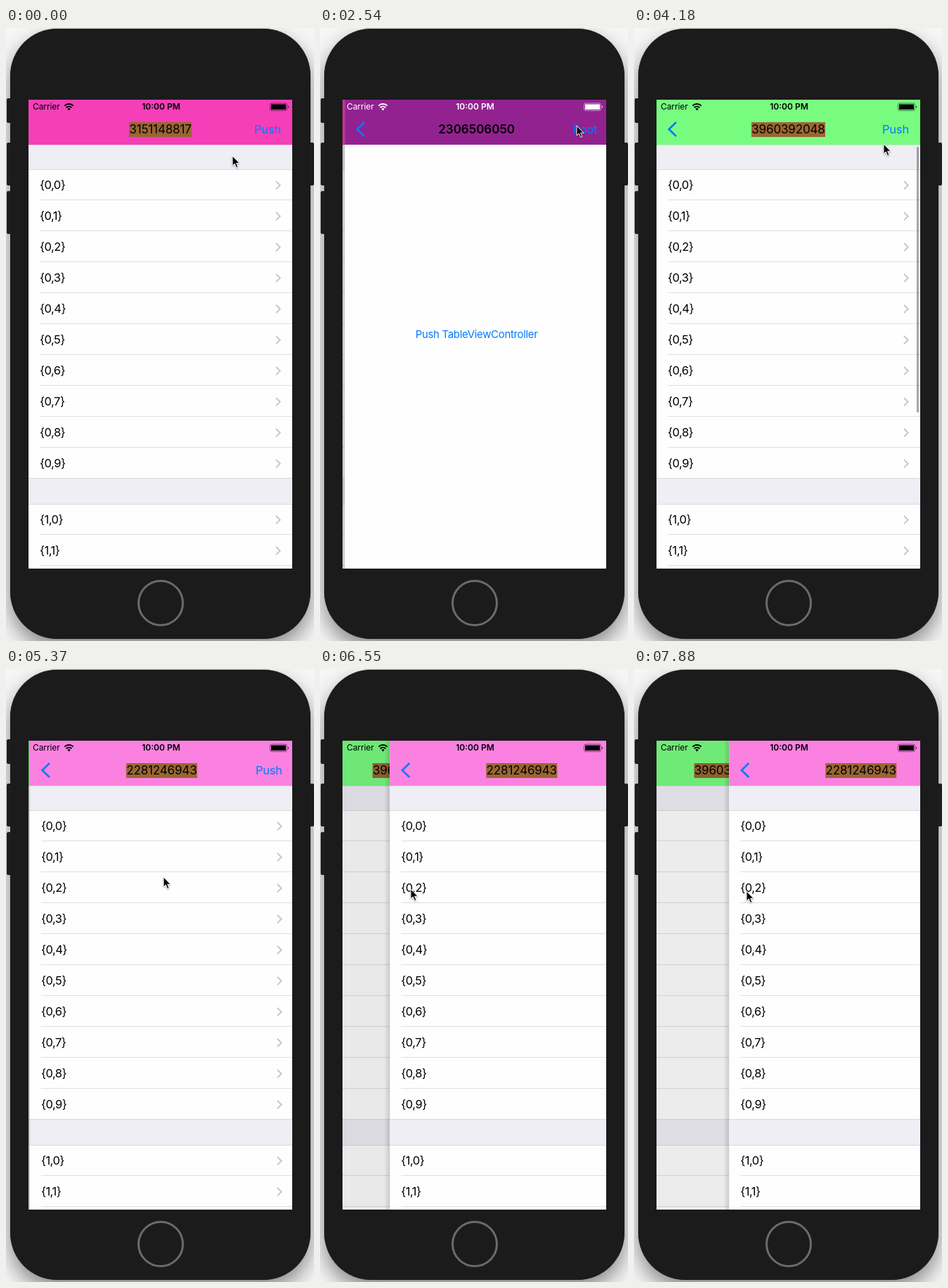
An HTML page that plays this animation: 438x872 px, repeating every 8 s.

```html
<!DOCTYPE html>
<html lang="en">
<head>
<meta charset="utf-8">
<title>Navigation bar transitions</title>
<style>
html, body { margin: 0; width: 100%; height: 100%; overflow: hidden; }
body { position: relative; background: #f6f6f6; font: 16.5px/44px Inter, sans-serif; letter-spacing: -.5px; color: #000; }
div, svg, b, i { position: absolute; box-sizing: border-box; font-style: normal; white-space: nowrap; }
svg { overflow: visible; fill: none; }
.key { width: 8px; background: #242424; border-radius: 2px; }
.body { left: 6px; top: 1px; width: 427px; height: 868px; border-radius: 67px; background: #1b1b1b;
  box-shadow: 0 0 1px #555, 0 14px 30px rgba(0, 0, 0, .45); }
.home { left: 187px; top: 785px; width: 66px; height: 66px; border: 3px solid #6b6b6b; border-radius: 50%; }
.screen { left: 32px; top: 102px; width: 375px; height: 667px; overflow: hidden; background: #fff; }
.page { width: 375px; height: 667px; background: #fefefe; }
.page::before { content: ""; position: absolute; left: -8px; width: 8px; height: 100%;
  background: linear-gradient(90deg, transparent, rgba(0, 0, 0, .14)); }
.bar { width: 375px; height: 64px; }
.title { left: 0; right: 0; top: 32px; line-height: 21px; text-align: center; font-size: 17px; letter-spacing: -.15px; }
.title span { display: inline-block; height: 21px; }
.boxed span { background: #963; }
.plain { font-weight: 600; letter-spacing: 0; }
.item { right: 16px; top: 20px; letter-spacing: -.2px; color: #007aff; }
.push { left: 0; right: 0; top: 312px; text-align: center; font-size: 15px; letter-spacing: -.33px; color: #007aff; }
.head { width: 375px; background: #efeef4; border: solid #dcdbe0; border-width: 1px 0; }
.row { left: 16px; width: 359px; height: 44px; border-bottom: 1px solid #dfdee2; }
.row svg { left: 335.5px; top: 16.5px; }
.scroll { left: 369.5px; top: 67px; width: 3px; height: 378px; border-radius: 2px; background: rgba(0, 0, 0, .35); }
.dim { width: 375px; height: 667px; background: #000; }
.status { width: 375px; height: 20px; z-index: 1; font-size: 12px; line-height: 20px; letter-spacing: 0; }
.status i { left: 6px; letter-spacing: -.1px; }
.status b { left: 0; right: 0; padding-left: 2px; text-align: center; font-weight: 600; }
#cursor { left: 0; top: 0; filter: drop-shadow(0 1px 1px rgba(0, 0, 0, .35)); }
</style>
</head>
<body>
<div class="key" style="left:1px;top:100px;height:35px"></div>
<div class="key" style="left:1px;top:163px;height:61px"></div>
<div class="key" style="left:1px;top:232px;height:61px"></div>
<div class="key" style="left:430px;top:163px;height:61px"></div>
<div class="body"></div>
<div class="home"></div>
<div class="screen" id="screen">
  <div class="status" id="status">
    <i>Carrier</i><b>10:00 PM</b>
    <svg width="375" height="20" stroke="currentColor">
      <path d="M51.3 8.6a9 9 0 0 1 12.4 0M53.6 11.2a5.8 5.8 0 0 1 7.8 0" stroke-width="2"/>
      <path d="M55.3 13a3.2 3.2 0 0 1 4.4 0L57.5 15.4z" fill="currentColor" stroke="none"/>
      <rect x="343.5" y="5" width="24" height="10.5" rx="2.5" stroke-opacity=".5"/>
      <path d="M345 6.5h21v7.5h-21zM369 8.5q2 1.7 0 3.5z" fill="currentColor" stroke="none"/>
    </svg>
  </div>
</div>
<svg id="cursor" width="12" height="18">
  <path d="M0 0V14L3.2 11L5.6 16.6L8 15.6L5.6 10.3H10Z" fill="#000" stroke="#fff"/>
</svg>
<script>
const LOOP = 8000, STEP = 148.6, WIDTH = 375;
const stage = document.getElementById('screen');
const statusBar = document.getElementById('status');
const cursor = document.getElementById('cursor');

// Times are in steps; "start" is when a page begins to slide in.
const pages = [
  { color: '#f53fb8', title: '3151148817', item: 'Push', table: true, start: -99 },
  { color: '#922290', title: '2306506050', item: 'Root', start: 14.7 },
  { color: '#78fc80', title: '3960392048', item: 'Push', table: true, start: 22.6 },
  { color: '#fb81e0', title: '2281246943', item: 'Push', table: true, start: 33.5 }
];

// Pointer moves: to each point between two times
const moves = [
  { from: 1, to: 5, x: 365, y: 139 },         // Push item
  { from: 18, to: 21, x: 224, y: 433 },       // button in the middle
  { from: 24, to: 28, x: 355, y: 165 },
  { from: 29, to: 32, x: 256, y: 286 },       // table row
  { from: 34, to: 36, x: 224, y: 296 },
  { from: 36, to: 39, x: 23, y: 310 },        // left edge
  { from: 39.2, to: 44.1, x: 129, y: 313 },   // first drag
  { from: 47, to: 49, x: 22, y: 315 },
  { from: 50, to: 53, x: 160, y: 316 }        // second drag
];
const RELEASE = 45, SECOND_DRAG = 50;

function easeOut(from, to, k) {
  const f = Math.min(1, Math.max(0, (k - from) / (to - from)));
  return 1 - (1 - f) ** 3;
}

function pointerAt(k) {
  return moves.reduce((p, m) => {
    const f = easeOut(m.from, m.to, k);
    return { x: p.x + (m.x - p.x) * f, y: p.y + (m.y - p.y) * f };
  }, { x: 322, y: 182 });
}

// The top page follows the pointer, and springs back after the first drag.
function dragAt(k, x) {
  if (k < moves[6].from) return 0;
  const pull = Math.max(0, (x - 71) * 1.16);
  return k < SECOND_DRAG ? pull * (1 - easeOut(RELEASE, RELEASE + 2, k)) : pull;
}

// Critically damped slide from the right edge
function slide(k, start) {
  if (k <= start) return WIDTH;
  const d = (k - start) * STEP / 50;
  const x = WIDTH * (1 + d) * Math.exp(-d);
  return x < .4 ? 0 : x;
}

function tableHtml() {
  const head = (y, h) => `<div class="head" style="top:${y}px;height:${h}px"></div>`;
  const rows = (section, top, count) => Array.from({ length: count }, (_, r) =>
    `<div class="row" style="top:${top + 44 * r}px">{${section},${r}}
      <svg width="8" height="12" stroke="#c7c7cc" stroke-width="2"><path d="M0 0L5.7 5.7L0 11.4"/></svg></div>`).join('');
  return rows(0, 99, 10) + rows(1, 575, 3) + head(64, 36) + head(538, 38) + '<div class="scroll"></div>';
}

pages.forEach((page, i) => {
  const el = page.el = document.createElement('div');
  el.className = 'page';
  const back = i ? `<svg style="left:16px;top:32px" width="12" height="20" stroke="#007aff" stroke-width="2.6">
    <path d="M12 0L1.7 10L12 20"/></svg>` : '';
  el.innerHTML = (page.table ? tableHtml() : '<div class="push">Push TableViewController</div>') +
    `<div class="bar" style="background:${page.color}">${back}
      <div class="title ${page.table ? 'boxed' : 'plain'}"><span>${page.title}</span></div>
      <div class="item">${page.item}</div></div><div class="dim"></div>`;
  stage.append(el);
  page.dim = el.querySelector('.dim');
  page.scroll = el.querySelector('.scroll');
});
const pushItem = pages[0].el.querySelector('.item');
const pushButton = pages[1].el.querySelector('.push');

function draw(time) {
  const k = Math.floor(time % LOOP / STEP);
  const pointer = pointerAt(k);
  const offsets = pages.map(p => slide(k, p.start));
  offsets[3] += dragAt(k, pointer.x);
  pages.forEach((page, i) => {
    const next = i < 3 ? offsets[i + 1] : WIDTH;
    const covered = WIDTH - next;
    page.el.style.transform = `translateX(${offsets[i] - .3 * covered}px)`;
    page.el.style.visibility = offsets[i] < WIDTH && next > 0 ? 'visible' : 'hidden';
    page.dim.style.opacity = .1 * covered / WIDTH;
    if (page.scroll) {
      const age = k - page.start;
      page.scroll.style.opacity = age > 3.4 && age < 6 ? 1 : 0;
    }
  });
  pushItem.style.opacity = k === 14 ? .3 : 1;
  pushButton.style.opacity = k === 22 ? .3 : 1;
  statusBar.style.color = k > pages[1].start && k < pages[2].start ? '#fff' : '#000';
  cursor.style.transform = `translate(${pointer.x}px,${pointer.y}px)`;
}

const began = performance.now();
function tick() {
  draw(performance.now() - began);
  requestAnimationFrame(tick);
}
tick();
</script>
</body>
</html>
```
